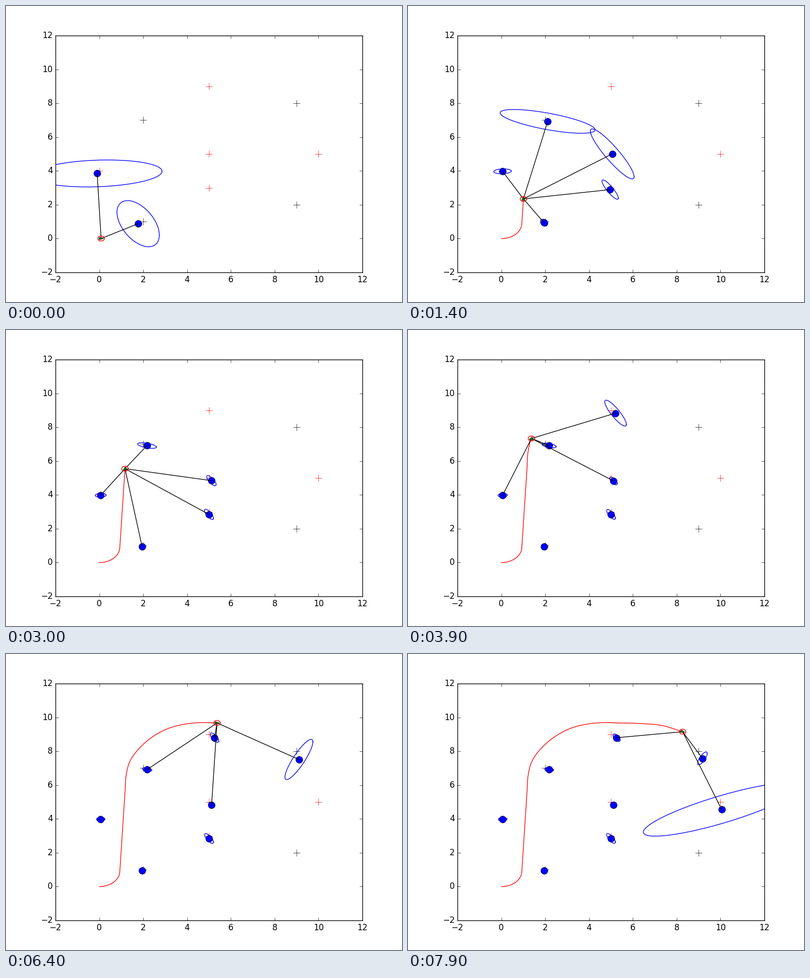
A matplotlib script for the animation above (8000 ms loop, 800x600 px).

```python
import numpy as np
import matplotlib.pyplot as plt
from matplotlib.animation import FuncAnimation

plt.style.use("classic")

FRAMES = 80
START, SPEED = 0.08, 0.2005
SENSOR_RANGE = 5
SHRINK, FLOOR = 0.75, 0.1

RED_MARKS = [(0, 4), (5, 3), (5, 5), (5, 9), (10, 5)]
DARK_MARKS = [(2, 1), (2, 7), (9, 8), (9, 2)]

# First guess x, y; settled x, y; settling time; half width, half height, correlation
LANDMARKS = [
    (-0.1, 3.85, 0.06, 3.98, 4, 2.96, 0.79, 0.16),
    (1.77, 0.88, 1.95, 0.94, 4, 0.96, 1.36, -0.5),
    (4.92, 2.95, 5.03, 2.81, 20, 2.17, 3.41, -0.93),
    (5.05, 5.03, 5.12, 4.82, 8, 1.67, 2.48, -0.92),
    (2.1, 6.93, 2.18, 6.92, 6, 3.64, 1.17, -0.72),
    (5.16, 8.87, 5.26, 8.8, 10, 2.3, 3.62, -0.9),
    (9.08, 7.49, 9.21, 7.62, 15, 1.78, 3.35, 0.89),
    (10.05, 4.56, 10.05, 4.56, 1, 3.57, 1.575, 0.85),
]

WAYPOINTS = np.array([
    (0.935, 0.916), (1.17, 5.54), (1.225, 6.6), (1.36, 7.3), (2, 8.41),
    (3.17, 9.36), (4.55, 9.69), (5.28, 9.675), (6.36, 9.64), (7.3, 9.53),
    (8.27, 9.155)])


def distance_along(points):
    steps = np.hypot(*np.diff(points, axis=0).T)
    return np.concatenate([[0], np.cumsum(steps)])


def spline(points, per_span=24):
    """Cubic Hermite curve through the points."""
    t = distance_along(points)
    slope = np.gradient(points, t, axis=0)
    u = np.linspace(0, 1, per_span, endpoint=False)[:, None]
    v = 1 - u
    spans = []
    for p, q, m, n, h in zip(points, points[1:], slope, slope[1:], np.diff(t)):
        spans.append((1 + 2 * u) * v**2 * p + (1 + 2 * v) * u**2 * q
                     + u * v * h * (v * m - u * n))
    return np.vstack(spans + [points[-1:]])


def build_path():
    u = np.linspace(0, np.pi / 2, 40, endpoint=False)
    w, h = WAYPOINTS[0]
    turn = np.column_stack([w * np.sin(u), h * (1 - np.cos(u))])
    return np.vstack([turn, spline(WAYPOINTS)])


PATH = build_path()
DIST = distance_along(PATH)
TRAVEL = START + SPEED * np.arange(FRAMES)


def position(s):
    return np.column_stack([np.interp(s, DIST, axis) for axis in PATH.T])


ROBOT = position(TRAVEL)
HEADING = np.arctan2(*(ROBOT - position(TRAVEL - 0.06)).T[::-1])
SETTLED = np.array(LANDMARKS)[:, 2:4]
SEEN = np.hypot(*(ROBOT[:, None] - SETTLED).T).T < SENSOR_RANGE
SIGHTINGS = np.cumsum(SEEN, axis=0)


def estimate(landmark, n):
    """Landmark centre, extents and correlation after n sightings."""
    x0, y0, x1, y1, settle, a, b, rho = landmark
    k = np.exp((1 - n) / settle)
    a, b = a * n**-SHRINK, b * n**-SHRINK
    wide, high = np.hypot(a, FLOOR), np.hypot(b, FLOOR)
    return (x1 + k * (x0 - x1), y1 + k * (y0 - y1),
            wide, high, rho * a * b / (wide * high))


THETA = np.linspace(0, 2 * np.pi, 181)


def ellipse(x, y, a, b, rho):
    return x + a * np.cos(THETA), y + b * np.cos(THETA - np.arccos(rho))


fig = plt.figure(figsize=(8, 6), dpi=100, facecolor="white")
ax = fig.add_axes([0.125, 0.1, 0.775, 0.8])
ticks = range(-2, 13, 2)
ax.set(xlim=(-2, 12), ylim=(-2, 12), xticks=ticks, yticks=ticks)


def line(style, z, **kw):
    return ax.plot([], [], style, zorder=z, **kw)[0]


for marks, color in ((RED_MARKS, "r"), (DARK_MARKS, "k")):
    ax.plot(*zip(*marks), "+", color=color, ms=10, mew=0.5, zorder=2)

trail = line("r-", 3)
rings = [line("b-", 4) for _ in LANDMARKS]
dots = line("bo", 5, ms=10, mew=0.5)
rays = [line("k-", 6) for _ in LANDMARKS]
body, = ax.fill([0, 0, 0], [0, 0, 0], fc="g", ec="k", lw=0.5, zorder=7)
halo = line("r-", 8)

TRIANGLE = np.array([(0.11, 0), (-0.09, 0.08), (-0.09, -0.08)])


def draw(frame):
    here, heading = ROBOT[frame], HEADING[frame]
    trail.set_data(*np.vstack([PATH[DIST < TRAVEL[frame]], here]).T)

    centres = []
    for i, landmark in enumerate(LANDMARKS):
        rings[i].set_data([], [])
        rays[i].set_data([], [])
        n = SIGHTINGS[frame, i]
        if n == 0:
            continue
        x, y, *shape = estimate(landmark, float(n))
        centres.append((x, y))
        rings[i].set_data(*ellipse(x, y, *shape))
        if SEEN[frame, i]:
            rays[i].set_data([here[0], x], [here[1], y])
    dots.set_data(*zip(*centres))

    c, s = np.cos(heading), np.sin(heading)
    body.set_xy(here + TRIANGLE @ np.array([(c, s), (-s, c)]))
    halo.set_data(*ellipse(*here, 0.15, 0.15, 0))
    return [trail, *rings, dots, *rays, body, halo]


anim = FuncAnimation(fig, draw, frames=FRAMES, interval=100,
                     init_func=lambda: draw(0), repeat=True, repeat_delay=0)
plt.show()
```
